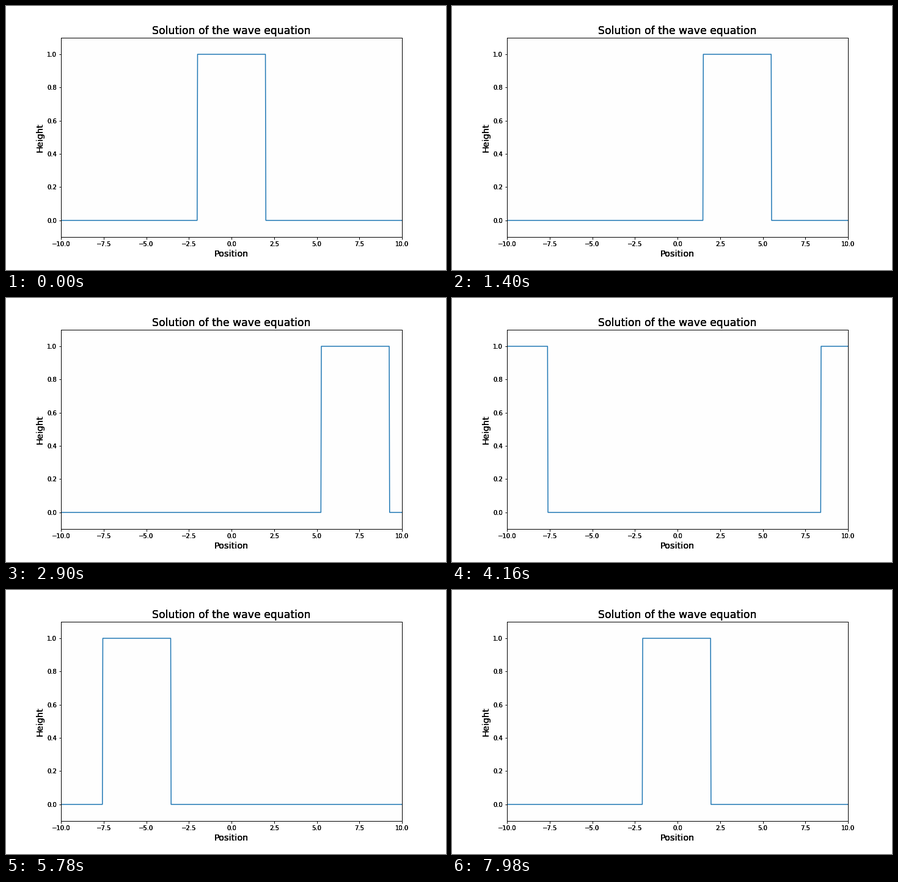
Recreate the animation shown at these times as a matplotlib script. Size 720 px wide and 432 px high, loop 8000 ms.

```python
import numpy as np
import matplotlib.pyplot as plt
from matplotlib.animation import FuncAnimation

FRAMES, INTERVAL = 400, 20
POINTS = 800
STEP = POINTS // FRAMES  # grid points travelled per frame

plt.rcParams.update({
    "font.family": "DejaVu Sans",
    "font.size": 12,
    "axes.titlesize": "x-large",
    "axes.labelsize": "large",
    "xtick.labelsize": 10,
    "ytick.labelsize": 10,
    "axes.linewidth": 1,
    "xtick.major.width": 1,
    "ytick.major.width": 1,
})


def embolden(text, passes=3):
    """Draw the text several times so its soft edges turn nearly solid."""
    draw = text.draw

    def repeat(renderer):
        for _ in range(passes):
            draw(renderer)

    text.draw = repeat


x = np.linspace(-10, 10, POINTS)
pulse = np.where(np.abs(x) < 2, 1.0, 0.0)

fig, ax = plt.subplots(figsize=(10, 6), dpi=72)
fig.subplots_adjust(left=0.125, right=0.9, bottom=0.125, top=0.88)
ax.set_facecolor("#fefefe")
ax.set(xlim=(-10, 10), ylim=(-0.1, 1.1),
       xticks=np.arange(-10, 10.1, 2.5), yticks=np.arange(0, 1.1, 0.2),
       xlabel="Position", ylabel="Height",
       title="Solution of the wave equation")
ax.xaxis.set_major_formatter("{x:.1f}")
ax.yaxis.set_major_formatter("{x:.1f}")

for text in [ax.title, ax.xaxis.label, ax.yaxis.label,
             *ax.get_xticklabels(), *ax.get_yticklabels()]:
    embolden(text)

line, = ax.plot(x, pulse, color="#1f77b4", lw=1.5)


def update(i):
    line.set_ydata(np.roll(pulse, STEP * i))
    return line,


anim = FuncAnimation(fig, update, frames=FRAMES, interval=INTERVAL,
                     repeat=True, repeat_delay=0)
plt.show()
```
